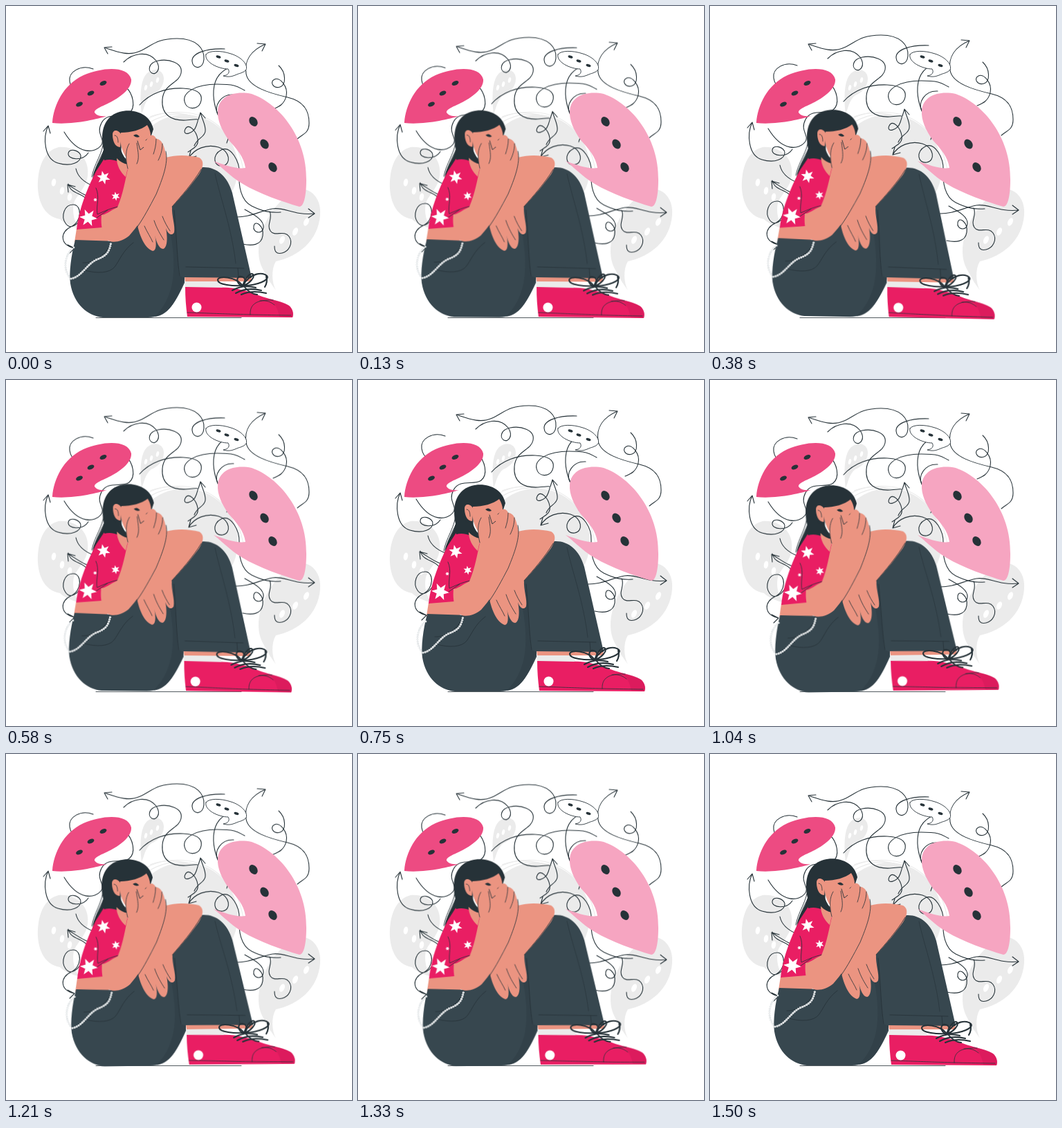
An HTML page that plays this animation: 500x500 px, repeating every 1540 ms.

```html
<!DOCTYPE html>
<html lang="en">
<head>
<meta charset="utf-8">
<title>Overthinking</title>
<style>
  html, body { margin: 0; width: 100%; height: 100%; overflow: hidden; background: #fff; }
  svg { display: block; width: 100vw; height: 100vh; }
  .line { fill: none; stroke: #263238; stroke-linecap: round; stroke-linejoin: round; }
  .ink { fill: #263238; }
  .grey { fill: #ebebeb; }
  .skin { fill: #eb9481; }
  .jeans { fill: #37474f; }
  .pink { fill: #e91e63; }
  #person { transform-origin: 250px 250px; }
</style>
</head>
<body>
<svg viewBox="0 0 500 500">
  <g id="backdrop">
    <g class="grey">
      <path d="M196 156C193 132 194 106 204 97C214 88 228 92 228 105C228 118 218 126 210 129C201 136 200 147 196 156Z"/>
      <path d="M46 264C45 233 55 209 76 204C97 202 116 215 118 235C121 260 103 270 98 285C95 300 100 317 108 322C95 319 84 314 78 308C60 305 48 290 46 264Z"/>
      <path d="M454 302C456 280 442 263 425 265C400 271 368 308 365 350C364 376 375 384 381 398L390 411C384 400 383 380 390 369C422 362 451 340 454 302Z"/>
      <circle cx="258" cy="234" r="77"/>
    </g>
    <g fill="none" stroke="#ebebeb" stroke-width="1.2">
      <path d="M200 166C230 147 280 149 308 174S340 220 344 242"/>
      <path d="M208 160C240 148 284 156 310 184S334 222 339 242"/>
      <path d="M204 170C240 148 275 154 300 176S328 215 334 240"/>
    </g>
  </g>

  <g id="scribbles" class="line" stroke-width="1.1">
    <path d="M142 60C160 66 177 73 194 65S218 47 247 47S287 62 286 77S270 92 269 80S290 61 316 62M153 59L142 60L147 69"/>
    <path d="M170 81C183 68 205 64 217 79C225 91 217 100 211 97S205 82 220 79S256 82 253 97S228 112 226 135S240 166 260 165S279 160 275 173S254 188 259 178S275 181 277 192S270 206 263 211"/>
    <path d="M281 154C284 166 289 172 288 181S277 190 272 202M278 164L281 154L288 162"/>
    <path d="M193 143C208 126 231 118 256 119S285 130 281 140S261 151 258 138S274 113 305 113S336 118 345 122"/>
    <path d="M375 55C354 64 344 79 347 98S381 126 407 132S438 154 438 169S429 185 421 192M363 54L375 55L370 65"/>
    <path d="M394 86C405 96 405 114 396 117S380 110 388 106S408 117 405 130S393 146 386 149"/>
    <path d="M331 86C309 92 301 105 300 122S304 158 316 171S320 192 319 198"/>
    <path d="M306 157C300 145 310 127 329 128"/>
    <path d="M126 91C108 84 90 95 92 109S107 131 122 131"/>
    <path d="M173 117C184 127 188 147 178 155S147 152 138 169S145 192 137 202S105 217 84 182"/>
    <path d="M61 173C53 190 55 221 75 227S108 225 108 217S91 204 90 213S111 225 119 212M54 181L61 173L64 184"/>
    <path d="M89 258C100 264 115 277 133 279M90 269L89 258L100 261"/>
    <path d="M101 235C104 249 116 256 126 260M90 257C93 272 111 270 117 280"/>
    <path d="M112 300C105 317 93 324 86 314S84 287 97 287S110 312 94 319S77 345 99 350M89 345L99 350L92 357"/>
    <path d="M264 220C272 206 290 199 307 204S326 229 313 231S297 215 311 208S338 225 337 242S339 281 355 289S382 299 397 298M267 209L264 220L275 217"/>
    <path d="M330 305C352 306 367 296 385 293S415 303 446 300M437 293L446 300L437 306"/>
    <path d="M345 294C359 302 373 309 372 320S356 328 358 318S373 318 371 332S355 347 342 344"/>
    <path d="M381 297C386 307 376 316 382 325S402 323 409 333S408 355 399 357S388 354 388 347"/>
  </g>

  <g id="bubbles">
    <path fill="#ed4b82" d="M67 168C69 144 82 114 112 100C140 88 176 86 181 106C182 118 168 130 151 139C139 145 127 149 128 154C131 159 140 160 146 159C130 164 95 172 67 169Z"/>
    <path fill="#f6a5c1" d="M306 151C308 130 330 122 355 127C395 141 435 190 434 251C434 276 430 290 424 290C400 283 365 271 342 257C322 245 309 230 300 224C316 230 334 236 346 234C344 218 333 206 322 194C312 180 305 165 306 151Z"/>
    <path class="line" style="fill:#fff" stroke-width=".9" d="M289 70C293 64 310 64 325 69C341 74 350 85 347 92C343 97 337 97 331 100C326 102 321 103 314 101C321 100 324 96 321 91C307 91 286 81 289 70Z"/>
  </g>

  <path class="line" stroke-width=".8" d="M130 450.5H340"/>

  <g id="person">
    <path class="ink" d="M141 208C135 180 143 159 164 153C184 147 209 156 213 178L209 190L167 192L166 222C149 219 135 234 126 254C122 240 137 225 141 208Z"/>
    <path class="line" stroke-width=".9" d="M141 183C144 210 128 224 124 247M143 205C134 226 125 236 126 262"/>

    <!-- legs -->
    <path class="skin" d="M102 322L143 317L148 342L99 341Z"/>
    <path class="skin" d="M258 391H354L355 398H259Z"/>
    <path class="grey" d="M258 398L309 398L316 409L259 408Z"/>
    <path class="jeans" d="M100 338C94 361 91 385 93 401C98 431 118 448 140 450H205C232 449 243 433 258 400L258 392L355 393L327 270C320 245 303 232 284 233L225 270L160 340Z"/>
    <path fill="#324149" d="M243 297L250 390L258 393C248 422 238 446 215 449C241 423 248 387 238 330Z"/>
    <g class="line" stroke-width=".8">
      <path d="M243 295C247 335 247 365 251 390M260 377L344 379M335 379L336 392"/>
      <path stroke-width=".6" d="M302 242C309 275 326 320 332 372"/>
      <path d="M111 371C126 372 142 360 150 347M114 382C132 387 150 386 157 377S169 353 184 342"/>
    </g>

    <!-- shoe -->
    <path class="pink" d="M259 406L312 407C327 406 344 411 358 415C374 423 397 426 409 433C415 438 416 446 414 450L262 449C260 434 259 421 259 406Z"/>
    <path fill="#d11b59" d="M381 423C392 426 402 428 409 433C415 438 416 446 414 450L395 449C393 438 389 430 381 423Z" opacity=".55"/>
    <circle cx="275.500" cy="435.500" r="7" fill="#fff"/>
    <g class="line" stroke-width=".8">
      <path d="M262 443C300 444 330 446 412 447M353 446C352 431 362 424 386 425M367 426C378 425 383 428 388 432"/>
      <g stroke-width="2.1">
        <path d="M342 404C332 391 306 389 306 396S329 405 342 404C353 385 372 384 377 390S362 404 344 404"/>
        <path d="M342 405C331 400 333 390 340 391S347 400 342 405C345 393 354 384 357 388S352 401 342 405"/>
        <path d="M327 411C337 405 350 404 361 407M332 415C344 408 357 408 369 411M340 417C351 412 363 412 376 415M343 404C348 411 354 416 363 417M376 391C378 397 377 401 374 406"/>
      </g>
    </g>

    <!-- torso and head -->
    <path class="pink" d="M141 222C150 217 161 218 175 232L180 260L162 300L139 320L102 323C105 293 119 260 130 239Z"/>
    <path class="ink" d="M141 198L167 188C163 204 166 215 178 226L172 232C164 224 153 220 142 223Z"/>
    <path class="skin" d="M160 220C165 225 170 228 177 229L173 247C165 240 160 230 160 220Z"/>
    <path class="skin" d="M166 183C181 183 195 179 204 172C210 181 211 192 206 207C201 222 190 230 182 226C172 221 163 204 166 183Z"/>
    <path class="skin" d="M167 187C163 178 154 178 154 186S157 204 165 204Z"/>
    <path class="line" stroke-width=".8" d="M157 187C161 187 162 192 162 197M158 202A2 2 0 1 0 160 204"/>
    <path class="ink" d="M184 187Q189 183 193 189Q188 191 184 187Z"/>
    <path class="line" stroke-width=".9" d="M190 195L194 208L199 204L202 212M202 194L207 190"/>
    <g id="stars" fill="#fff"></g>
    <path class="line" stroke-width=".8" d="M130 263C136 276 130 287 132 301C143 296 152 292 162 290M131 306L147 295"/>

    <!-- far arm and hanging hand -->
    <path class="skin" d="M231 219C248 214 267 216 279 219C288 224 284 235 279 243C269 257 256 273 240 290C239 303 245 318 243 327C240 333 234 330 231 321C234 335 233 350 227 351C221 351 217 340 215 331C218 344 217 354 212 354C200 350 193 331 190 317L211 283Z"/>
    <path class="line" stroke-width=".8" d="M200 318C204 327 209 334 212 341M214 310C218 322 223 330 228 338M226 304C229 312 233 319 237 325M282 236C270 256 253 275 240 290"/>

    <!-- near arm covering the face -->
    <path class="skin" d="M138 302C144 302 150 296 161 291C170 269 172 252 176 236C172 222 173 207 178 199C183 192 189 194 189 201C190 209 192 213 196 214C199 206 201 195 206 189C211 184 216 188 217 192C224 192 228 200 230 210C235 222 232 235 227 248C216 275 200 308 178 332C166 342 150 344 143 335C138 325 137 312 138 302Z"/>
    <path class="line" stroke-width=".8" d="M189 198C191 212 193 220 189 228M217 192C217 201 215 208 213 214M226 199C226 209 223 217 220 223M231 210C235 227 226 250 217 272C207 291 199 306 190 319M176 235C172 219 173 207 178 199"/>

    <!-- belt chain -->
    <g fill="none" stroke-linecap="round" stroke-dasharray="0 3.300">
      <path stroke="#cfd5d8" stroke-width="2.800" d="M98 349C84 359 82 382 93 393"/>
      <path stroke="#fff" stroke-width="1.700" d="M98 349C84 359 82 382 93 393"/>
      <path stroke="#fff" stroke-width="3.200" d="M94 394C110 391 117 372 132 366S149 355 152 341"/>
      <path stroke="#718087" stroke-width="1.100" d="M94 394C110 391 117 372 132 366S149 355 152 341"/>
    </g>
  </g>
</svg>
<script>
  const byId = id => document.getElementById(id);

  function add(parent, tag, attrs) {
    const el = document.createElementNS('http://www.w3.org/2000/svg', tag);
    for (const key in attrs) el.setAttribute(key, attrs[key]);
    parent.appendChild(el);
  }

  function dots(parent, fill, rx, ry, tilt, centres) {
    for (const [x, y] of centres)
      add(parent, 'ellipse', { cx: x, cy: y, rx, ry, fill, transform: `rotate(${tilt} ${x} ${y})` });
  }

  function star(x, y, r, turn) {
    const points = Array.from({ length: 12 }, (_, i) => {
      const a = turn + i * Math.PI / 6, d = i % 2 ? r * 0.45 : r;
      return (x + d * Math.cos(a)).toFixed(1) + ',' + (y + d * Math.sin(a)).toFixed(1);
    });
    add(byId('stars'), 'polygon', { points: points.join(' ') });
  }

  const ink = '#263238', back = byId('backdrop'), front = byId('bubbles');
  dots(back, '#fff', 2, 4, 15, [[202, 118], [210, 113], [219, 107]]);
  dots(back, '#fff', 3.2, 5.5, 10, [[69, 255], [81, 267], [92, 276]]);
  dots(back, '#fff', 3.5, 6, 25, [[434, 312], [418, 326], [399, 338]]);
  dots(front, ink, 5.2, 3, -24, [[106, 142], [122.5, 126], [140.5, 111.5]]);
  dots(front, ink, 5.5, 7.5, -35, [[357.5, 167], [373.5, 199.5], [385.5, 233]]);
  dots(front, ink, 3.6, 1.8, 18, [[307, 73.5], [319, 79.5], [333, 86]]);

  star(141, 248, 10, 0.3);
  star(119, 306, 13, 0.1);
  star(158.5, 275, 6.5, 0.4);
  star(129, 280, 3, 0);

  // 37 pictures per loop; the last one repeats the first pose.
  const COUNT = 37;
  function loop(id, poses) {
    const frames = poses.map(([n, transform]) => ({ offset: n / COUNT, transform }));
    byId(id).animate(frames, { duration: 1540, iterations: Infinity, easing: `steps(${COUNT}, end)` });
  }

  const up = y => `translateY(${y}px)`, tilt = a => `rotate(${a}deg)`;
  loop('scribbles', [[0, up(0)], [18, up(-10)], [36, up(0)], [37, up(0)]]);
  loop('person', [[0, tilt(0)], [9, tilt(1)], [27, tilt(-1)], [36, tilt(0)], [37, tilt(0)]]);
</script>
</body>
</html>
```
